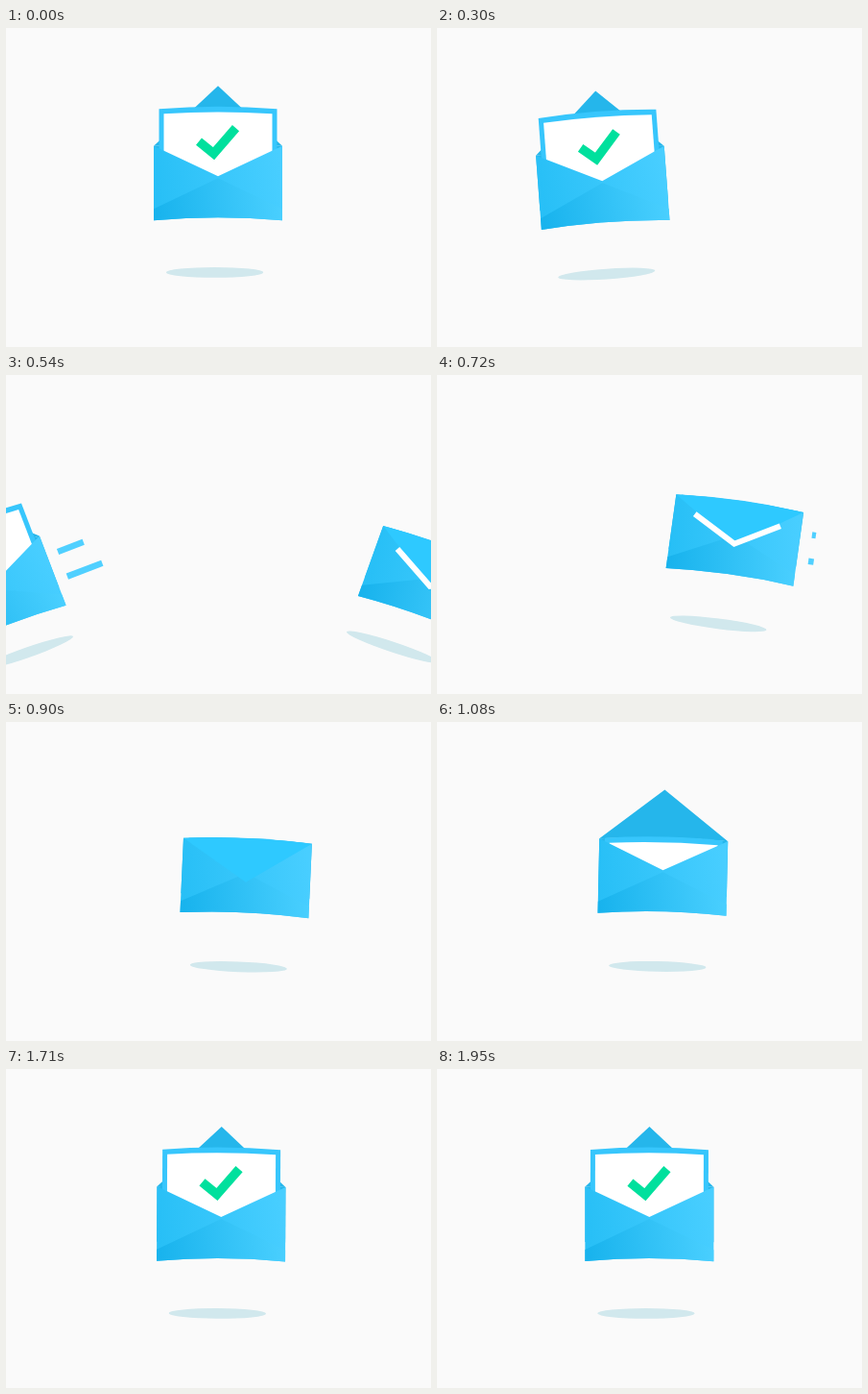
These frames come from a looping animation (443x332 px, 1.98 s). An HTML page with a canvas:

```html
<!DOCTYPE html>
<html>
<head>
<meta charset="utf-8">
<title>Mail carousel</title>
<style>
html, body { margin: 0; width: 100%; height: 100%; overflow: hidden; background: #fafafa; }
canvas { display: block; }
</style>
</head>
<body>
<canvas id="stage" width="443" height="332"></canvas>
<script>
const ctx = document.getElementById('stage').getContext('2d');
const LOOP = 1980, SPACING = 430, CENTER = 221, PIVOT = 845;

// [time, distance travelled along the arc, speed]
const TRAVEL = [
  [0, 0, .015], [300, 45.3, .43], [540, 221, .85], [720, 346, .5],
  [1080, 416.5, .026], [1440, 423.5, .015], [LOOP, SPACING, .012]
];

function travel(t) {
  const i = Math.max(1, TRAVEL.findIndex(k => t <= k[0]));
  const [t0, a, va] = TRAVEL[i - 1], [t1, b, vb] = TRAVEL[i];
  const h = t1 - t0, s = (t - t0) / h, r = 1 - s;
  return r * r * ((1 + 2 * s) * a + s * h * va) + s * s * ((1 + 2 * r) * b - r * h * vb);
}

const ramp = (t, from, to) => Math.min(1, Math.max(0, (t - from) / (to - from)));
const ease = (t, from, to) => { const p = ramp(t, from, to); return p * p * (3 - 2 * p); };

// The arc peaks slightly right of the centre.
const sink = d => .0063 * Math.abs(d - 6) ** 1.7;

function gradient(left, right) {
  const g = ctx.createLinearGradient(-67, 180, 67, 160);
  g.addColorStop(0, left);
  g.addColorStop(1, right);
  return g;
}
const FRONT = gradient('#27bff6', '#48ceff');
const FOLD = gradient('#18b3ed', '#4bd0ff');
const INSIDE = '#25b6eb', FLAP = '#2ec9ff';

function fill(color, path) {
  ctx.fillStyle = color;
  ctx.fill(new Path2D(path));
}

function line(color, width, points) {
  ctx.strokeStyle = color;
  ctx.lineWidth = width;
  ctx.beginPath();
  points.forEach(p => ctx.lineTo(...p));
  ctx.stroke();
}

function shadow(d) {
  ctx.save();
  ctx.translate(CENTER, PIVOT);
  ctx.rotate(d * .0875 * Math.PI / 180);
  ctx.fillStyle = '#d1e8ed';
  ctx.beginPath();
  ctx.ellipse(-3.4, 254.4 - PIVOT, 50.6, 5.4, 0, 0, 7);
  ctx.fill();
  ctx.restore();
}

function letter(drop, tick) {
  ctx.save();
  ctx.translate(0, drop);
  fill('#37c6fc', 'M-61.5 84Q0 79 61.5 84V155H-61.5Z');
  fill('#fff', 'M-56.5 89Q0 85.5 56.5 89V155H-56.5Z');
  if (tick > 0) {
    ctx.setLineDash([55 * tick, 99]);
    line('#00e09d', 9.5, [[-20, 118], [-4.5, 130.5], [18.5, 104]]);
  }
  ctx.restore();
}

function envelope(d, age, streak) {
  const apex = 166 - 106 * ease(age, 890, 1125);
  const flap = `M-67 122.5Q0 117.5 67 122.5L0 ${apex}Z`;
  const closed = apex > 122;
  const v = 1 - ease(age, 770, 890);

  shadow(d);
  ctx.save();
  ctx.translate(CENTER + d, 200 + sink(d));
  ctx.rotate(d / 605);
  ctx.translate(0, -200);

  fill(INSIDE, 'M-67 122.5Q0 117.5 67 122.5V180H-67Z');
  if (!closed) fill(INSIDE, flap);
  letter(38 * (1 - ease(age, 1070, 1320)), ease(age, 1480, 1700));
  fill(FRONT, 'M-67 122.5L0 154L67 122.5V200Q0 194 -67 200Z');
  fill(FOLD, 'M-67 188L0 156L67 188V200Q0 194 -67 200Z');
  if (closed) fill(FLAP, flap);
  if (v > 0) line('#fff', 6, [[-45 * v, 165 - 25 * v], [0, 165], [45 * v, 165 - 25 * v]]);

  ctx.fillStyle = '#50d0ff';
  ctx.fillRect(79, 141.5, 28.5 * streak, 6.5);
  ctx.fillRect(79, 169, 39 * streak, 6.5);
  ctx.restore();
}

// Five pictures per 180 ms; the first of them stays twice as long.
function hold(t) {
  const p = t % 180;
  return t - p + (p < 60 ? 0 : Math.floor(p / 30) * 30);
}

let start;
function frame(now) {
  start ??= now;
  const t = hold((now - start) % LOOP);
  const d = -travel(t);
  const streak = ease(t, 330, 510) * (1 - ramp(t, 570, 745));
  ctx.fillStyle = '#fafafa';
  ctx.fillRect(0, 0, 443, 332);
  envelope(d, t + LOOP, streak);
  envelope(d + SPACING, t, streak);
  requestAnimationFrame(frame);
}
requestAnimationFrame(frame);
</script>
</body>
</html>
```
